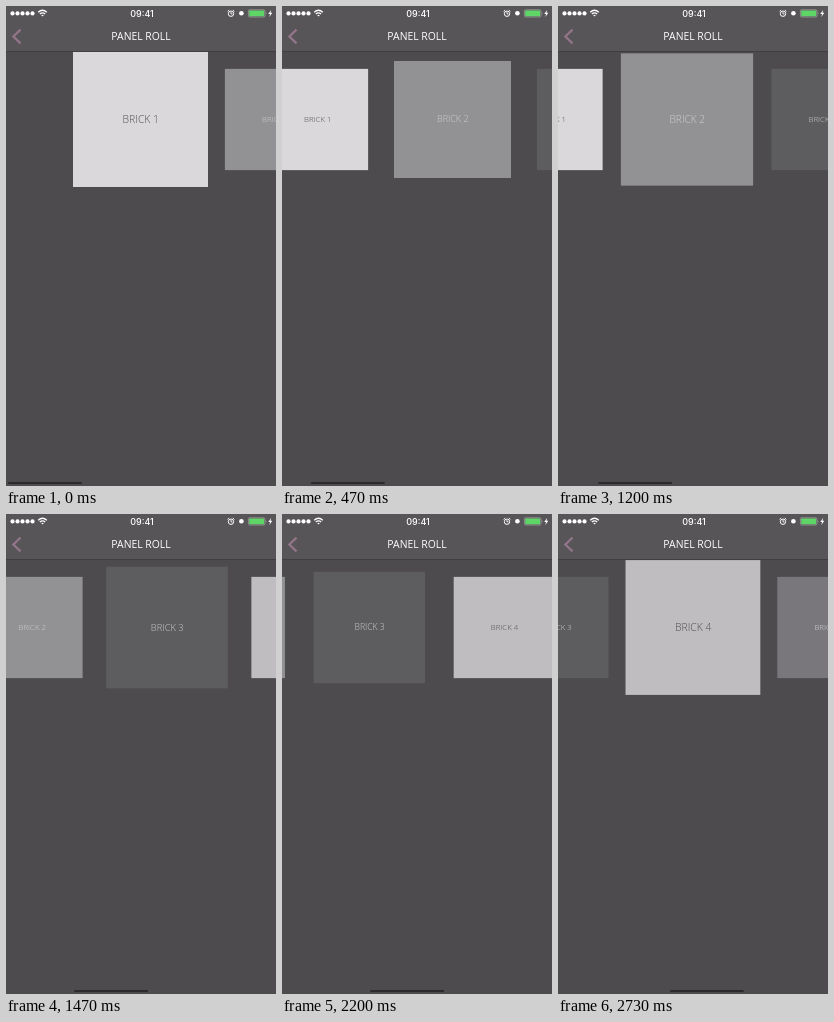
Recreate the animation shown at these times as an HTML page. Size 270 by 480 pixels, loop 2870 ms.

```html
<!DOCTYPE html>
<html lang="en">
<head>
<meta charset="utf-8">
<title>Panel roll</title>
<style>
  html, body { margin: 0; width: 100%; height: 100%; overflow: hidden; background: #4d4b4e; }
  svg { display: block; width: 100vw; height: 100vh; }
  text { text-anchor: middle; }
  .label { font: 300 10.4px "Open Sans", "Noto Sans", sans-serif; }
  .title { font: 500 10.4px "Open Sans", "Noto Sans", sans-serif; fill: #fff; }
  .clock { font: 500 9px Inter, "Liberation Sans", sans-serif; fill: #fff; }
</style>
</head>
<body>
<svg viewBox="0 0 270 480">
  <rect width="270" height="480" fill="#4d4b4e"/>
  <rect width="270" height="46" fill="#585558"/>
  <rect y="45" width="270" height="1" fill="#403e41"/>

  <g id="bricks"></g>

  <g id="signal" fill="#fff"></g>
  <g fill="none" stroke="#fff" stroke-width="1.3">
    <path d="M32.2 6.2 Q36.5 2.4 40.8 6.2 M33.9 8 Q36.5 5.7 39.1 8"/>
    <path d="M35.2 9.2 L36.5 10.6 L37.8 9.2 Q36.5 8.3 35.2 9.2Z" fill="#fff" stroke="none"/>
  </g>
  <text class="clock" x="136" y="10.6">09:41</text>
  <g fill="none" stroke="#fff" stroke-width="1">
    <circle cx="225" cy="7.7" r="2.7"/>
    <path d="M225 6 V7.9 H226.5 M221.6 5.4 L223.2 4 M228.4 5.4 L226.8 4" stroke-width=".9"/>
  </g>
  <circle cx="235.4" cy="7.3" r="2.3" fill="#fff"/>
  <rect x="242.4" y="3.8" width="16.6" height="7.2" rx="1.4" fill="none" stroke="#aaa8aa" stroke-width=".7"/>
  <rect x="243.2" y="4.6" width="15" height="5.6" rx=".7" fill="#5fd467"/>
  <path d="M259.9 6 q1.1 1.4 0 2.8z" fill="#aaa8aa"/>
  <path d="M265.2 3.8 L262.3 8 H264.1 L263.3 11 L266.3 6.7 H264.5Z" fill="#fff"/>

  <path d="M14.5 23.6 L7.4 30.5 L14.5 37.4" fill="none" stroke="#927588" stroke-width="2.3"/>
  <text class="title" x="135" y="34.2">PANEL ROLL</text>

  <rect id="bar" y="476" width="74" height="2" rx="1" fill="#2b292c"/>
</svg>
<script>
  const NS = "http://www.w3.org/2000/svg";
  const SIZE = 135, CENTER_X = 134.5, CENTER_Y = 113.5, MIN_SCALE = 0.75;
  const LOOP = 2870, TICK = 1000 / 15;

  // [fill, label colour]
  const COLORS = [
    ["#dad8da", "#4f4d50"],
    ["#929193", "#d0cfd1"],
    ["#5d5c5e", "#d0cfd1"],
    ["#bfbdc0", "#4f4d50"],
    ["#79777b", "#d8d7d9"]
  ];

  // Each swipe follows the finger tick by tick, then settles on the next brick.
  const SWIPES = [
    { start: 1, end: 135, drag: [2, 6, 14, 27, 46, 72, 99] },
    { start: 16, end: 270, drag: [136, 136, 140.5, 155, 183, 217, 243.5] },
    { start: 32, end: 405, drag: [288, 317.2, 349, 378] }
  ];

  function add(parent, name, attrs) {
    const el = document.createElementNS(NS, name);
    for (const key in attrs) el.setAttribute(key, attrs[key]);
    return parent.appendChild(el);
  }

  const signal = document.getElementById("signal");
  for (let i = 0; i < 5; i++) add(signal, "circle", { cx: 6.5 + i * 5, cy: 7.4, r: 2.1 });

  const bar = document.getElementById("bar");
  const bricks = COLORS.map(([fill, ink], i) => {
    const g = add(document.getElementById("bricks"), "g", {});
    add(g, "rect", { x: -SIZE / 2, y: -SIZE / 2, width: SIZE, height: SIZE, fill });
    add(g, "text", { class: "label", x: 0.3, y: 3.4, fill: ink }).textContent = "BRICK " + (i + 1);
    return g;
  });

  function scrollAt(tick) {
    let pos = 0;
    for (const { start, end, drag } of SWIPES) {
      const n = tick - start;
      if (n < 0) break;
      const last = drag.length - 1;
      pos = n <= last ? drag[n] : end - (end - drag[last]) * 0.5 ** (n - last);
    }
    return pos;
  }

  function draw(scroll) {
    bricks.forEach((g, i) => {
      const dx = i * SIZE - scroll;
      const far = Math.min(1, Math.abs(dx) / (SIZE / 2));
      const scale = 1 - (1 - MIN_SCALE) * far;
      g.setAttribute("transform", `translate(${CENTER_X + dx} ${CENTER_Y}) scale(${scale})`);
    });
    bar.setAttribute("x", 2 + scroll * 0.2716);
  }

  const begin = performance.now();
  function frame() {
    const t = Math.max(0, performance.now() - begin) % LOOP;
    const tick = Math.floor((Math.floor(t / 10) * 10 + 3.4) / TICK);
    draw(scrollAt(tick));
    requestAnimationFrame(frame);
  }
  frame();
</script>
</body>
</html>
```
